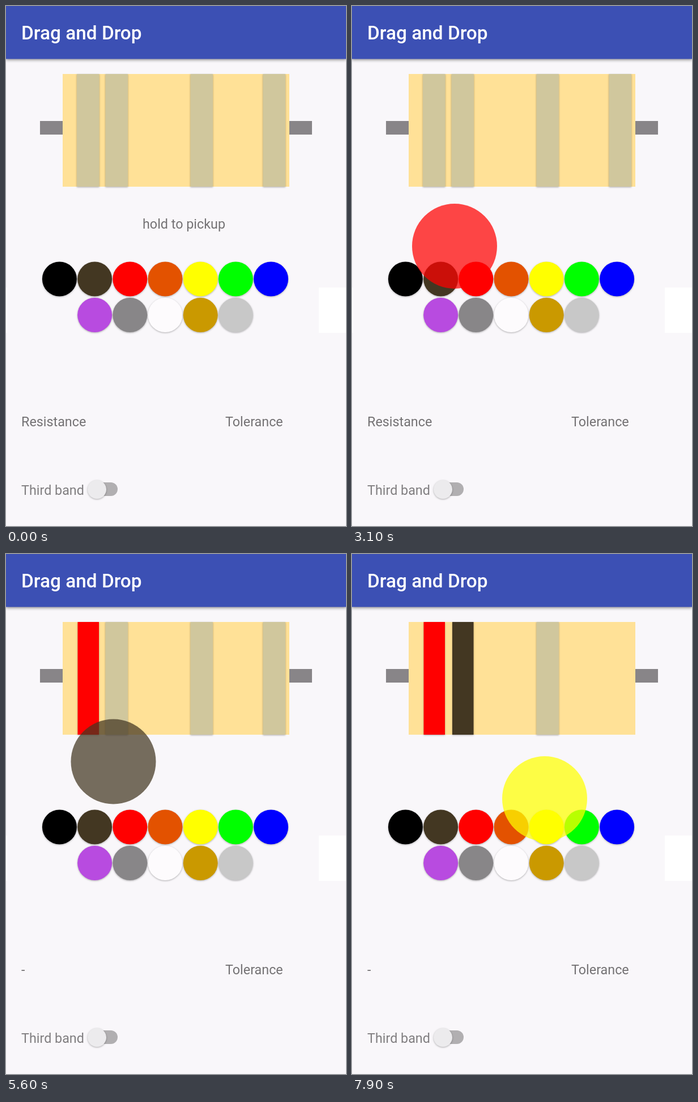
Animation of 600 by 918 pixels, one loop 8000 ms. Source, as an HTML page:

```html
<!DOCTYPE html>
<html lang="en">
<head>
<meta charset="utf-8">
<title>Drag and Drop</title>
<style>
  html, body { margin: 0; width: 100%; height: 100%; overflow: hidden; background: #f9f7fa; }
  svg { display: block; font: 23.33px Roboto, sans-serif; fill: #747274; }
  .title { font-size: 33.33px; font-weight: 500; fill: #fff; }
  .raised { filter: drop-shadow(0 1.5px 1.5px rgba(0, 0, 0, .3)); }
  .bar { filter: drop-shadow(0 2px 2.5px rgba(0, 0, 0, .4)); }
</style>
</head>
<body>
<svg width="600" height="918" viewBox="0 0 600 918">
  <rect width="600" height="918" fill="#f9f7fa"/>
  <rect x="552" y="497" width="48" height="80" fill="#fff"/>
  <rect id="edge" y="497" width="2" height="80" fill="#fff"/>
  <rect class="bar" y="-9" width="600" height="102.5" fill="#3c50b4"/>
  <text class="title" x="27" y="59">Drag and Drop</text>

  <rect x="60" y="203" width="480" height="24" fill="#888588"/>
  <rect x="100" y="120" width="400" height="199" fill="#ffe197"/>
  <g id="bands"></g>

  <text id="hint" x="241" y="393">hold to pickup</text>
  <g id="palette"></g>
  <text id="resistance" x="27" y="742">Resistance</text>
  <text x="387" y="742">Tolerance</text>
  <text x="27" y="862.5" fill="#807e80">Third band</text>
  <rect x="149" y="841" width="48" height="24" rx="12" fill="#b1afb1"/>
  <circle class="raised" cx="160.5" cy="853.5" r="16.5" fill="#ecebed"/>
  <circle id="chip" r="75" opacity=".72"/>
</svg>
<script>
const LOOP = 8000, STEP = 100;
const RED = '#f00', BROWN = '#433722', YELLOW = '#ff0', EMPTY = '#d0c79d';

// Each drag path lists [ms, x, y]; the chip is dropped at the last time.
const drags = [
  { color: RED, path: [[2400, 216, 482], [2700, 204, 470], [3100, 181, 424], [3400, 152, 310], [3700, 141, 222], [4200, 143, 216]] },
  { color: BROWN, path: [[5000, 156, 482], [5200, 167, 440], [5400, 182, 381], [5600, 189.5, 366.5], [6000, 194, 245], [6300, 196, 220]] },
  { color: YELLOW, path: [[7500, 341, 482], [7700, 337, 468], [7900, 340, 432], [8000, 340, 420]] }
];

const $ = id => document.getElementById(id);

function add(parent, tag, attributes) {
  const node = document.createElementNS('http://www.w3.org/2000/svg', tag);
  for (const name in attributes) node.setAttribute(name, attributes[name]);
  return parent.appendChild(node);
}

const bands = [125, 175.5, 325.5, 453.5].map(x =>
  add($('bands'), 'rect', { class: 'raised', x, y: 120, width: 39.5, height: 199, fill: EMPTY }));

function addRow(x, y, colors) {
  colors.forEach((fill, i) =>
    add($('palette'), 'circle', { class: 'raised', cx: x + i * 62.2, cy: y, r: 30.5, fill }));
}
addRow(94.4, 482, ['#000', BROWN, RED, '#e35200', YELLOW, '#0f0', '#00f']);
addRow(156.6, 545.5, ['#b84be0', '#888688', '#fdfbfd', '#ca9900', '#c8c8c8']);

function position(path, t) {
  const i = path.findIndex(key => key[0] > t);
  const [t0, x0, y0] = path[i - 1], [t1, x1, y1] = path[i];
  const k = (t - t0) / (t1 - t0);
  return [x0 + (x1 - x0) * k, y0 + (y1 - y0) * k];
}

function show(node, visible) {
  node.setAttribute('visibility', visible ? 'visible' : 'hidden');
}

function paintBand(band, x, drag, t) {
  const filled = t >= drag.path.at(-1)[0];
  band.setAttribute('fill', filled ? drag.color : EMPTY);
  band.setAttribute('x', filled ? x + 1.5 : x);
  band.setAttribute('width', filled ? 37.5 : 39.5);
}

function render(t) {
  const active = drags.find(({ path }) => t >= path[0][0] && t < path.at(-1)[0]);
  show($('chip'), active);
  if (active) {
    const [x, y] = position(active.path, t);
    $('chip').setAttribute('cx', x);
    $('chip').setAttribute('cy', y);
    $('chip').setAttribute('fill', active.color);
  }
  paintBand(bands[0], 125, drags[0], t);
  paintBand(bands[1], 175.5, drags[1], t);
  show(bands[3], t < drags[2].path[0][0]);
  show($('hint'), t < drags[0].path[0][0]);
  show($('edge'), t < drags[1].path.at(-1)[0]);
  $('resistance').textContent = t < drags[0].path.at(-1)[0] ? 'Resistance' : '-';
}

function tick() {
  render(Math.floor(performance.now() % LOOP / STEP) * STEP);
  requestAnimationFrame(tick);
}
tick();
</script>
</body>
</html>
```
